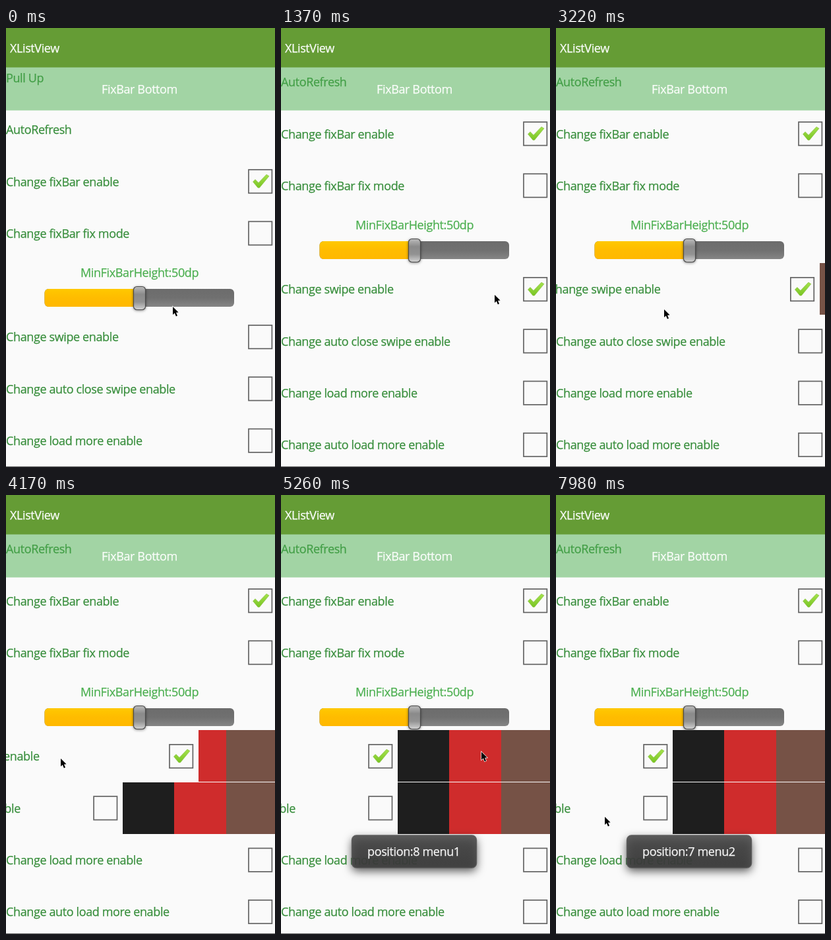
An HTML page with a canvas for the animation above (8000 ms loop, 408 by 663 pixels).

```html
<!DOCTYPE html>
<html lang="en">
<head>
<meta charset="utf-8">
<title>XListView</title>
<style>
  html, body { margin: 0; width: 100%; height: 100%; overflow: hidden; background: #fafafa; }
  canvas { display: block; }
</style>
</head>
<body>
<canvas id="stage" width="408" height="663"></canvas>
<script>
const ctx = document.getElementById('stage').getContext('2d');
const LOOP = 8000, ROW = 78.3, LIST_WIDTH = 411.8, OPEN = 3 * ROW, SETTLE = 290;
const MENU = ['#1e1e1e', '#cf2c2c', '#765246'];
const ROWS = ['Pull Up', 'AutoRefresh', 'Change fixBar enable', 'Change fixBar fix mode', null,
  'Change swipe enable', 'Change auto close swipe enable', 'Change load more enable',
  'Change auto load more enable'];

// The pointer glides to `from` between leave and press, then drags to `to` until release.
// A dragged row follows the pointer and settles at `rest` after the release.
const gesture = (leave, press, release, from, to = from, row = -1, rest = 0) =>
  ({ leave, press, release, from, to, row, rest });
const GESTURES = [
  gesture(0, 45, 290, [253, 421], [253, 380]),
  gesture(470, 950, 1370, [324, 399], [324, 403]),
  gesture(1680, 1680, 1900, [324, 403], [262, 412], 5),
  gesture(1900, 2150, 3000, [249, 435], [164, 425], 5),
  gesture(3220, 3460, 3680, [300, 456], [130, 446], 6, OPEN),
  gesture(3680, 3900, 4170, [203, 398], [83, 398], 5, OPEN),
  gesture(4170, 4590, 4590, [230, 470]),
  gesture(4840, 5260, 5260, [304, 388]),
  gesture(5940, 6900, 7200, [273, 588], [203, 577], 7),
  gesture(7740, 7980, 7980, [74, 486])
];

const mix = (a, b, p) => a + (b - a) * p;

function ramp(t, start, end) {
  const p = Math.min(1, Math.max(0, (t - start) / (end - start || 1)));
  return p * p * (3 - 2 * p);
}

function pointerAt(t) {
  return GESTURES.reduce((pos, g) => {
    const glide = ramp(t, g.leave, g.press), drag = ramp(t, g.press, g.release);
    return pos.map((v, i) => mix(mix(v, g.from[i], glide), g.to[i], drag));
  }, GESTURES[0].from);
}

function rowShift(row, t) {
  const g = GESTURES.filter(g => g.row === row && t >= g.press).pop();
  if (!g) return 0;
  const dragged = (g.from[0] - g.to[0]) * ramp(t, g.press, g.release);
  return mix(dragged, g.rest, ramp(t, g.release, g.release + SETTLE));
}

// A hairline outline gives the slightly heavier weight of the lettering.
function text(str, x, y, color, align = 'left') {
  ctx.fillStyle = ctx.strokeStyle = color;
  ctx.lineWidth = 0.25;
  ctx.textAlign = align;
  ctx.fillText(str, x, y);
  ctx.strokeText(str, x, y);
}

function rect(x, y, w, h, fill) {
  ctx.fillStyle = fill;
  ctx.fillRect(x, y, w, h);
}

function rounded(x, y, w, h, r, fill) {
  ctx.beginPath();
  ctx.roundRect(x, y, w, h, r);
  ctx.fillStyle = fill;
  ctx.fill();
}

function outline(color, width) {
  ctx.strokeStyle = color;
  ctx.lineWidth = width;
  ctx.stroke();
}

function gradient(y0, y1, ...colors) {
  const g = ctx.createLinearGradient(0, y0, 0, y1);
  colors.forEach((color, i) => g.addColorStop(i / (colors.length - 1), color));
  return g;
}

function polygon(x, y, points) {
  ctx.beginPath();
  points.forEach(([px, py]) => ctx.lineTo(x + px, y + py));
  ctx.closePath();
}

function shadow(color, blur, offset) {
  ctx.shadowColor = color;
  ctx.shadowBlur = blur;
  ctx.shadowOffsetY = offset;
}

function checkbox(x, y, checked) {
  ctx.strokeStyle = '#636363';
  ctx.lineWidth = 1.7;
  ctx.strokeRect(x, y - 17.7, 35.4, 35.4);
  if (!checked) return;
  polygon(x + 18, y, [[-11.5, 0.5], [-8, -3], [-3, 2], [9, -10.5], [13, -8], [-1.5, 9.5], [-4, 9.5]]);
  ctx.fillStyle = gradient(y - 11, y + 10, '#a6e34e', '#78c422');
  ctx.fill();
  outline('rgba(120,180,50,.5)', 1);
}

function slider(y) {
  text('MinFixBarHeight:50dp', 202.5, Math.round(y - 12.3), '#4caf50', 'center');
  const top = Math.round(y + 5.4), end = top + 27;
  rounded(58.5, top, 287.5, 27, 6, gradient(top, end, '#6c6c6c', '#707070', '#858585'));
  rounded(58.5, top, 140, 27, [6, 0, 0, 6], gradient(top, end, '#ffc800', '#ffbc00', '#ffb800'));
  ctx.save();
  shadow('rgba(0,0,0,.6)', 4, 1);
  rounded(193.5, top - 3.5, 18, 35, 5, gradient(top - 3, top + 31, '#b9b9b9', '#8a8a8a', '#929292', '#d0d0d0'));
  ctx.restore();
  outline('#4c4c4c', 1.2);
}

function menu(y, shift) {
  const top = Math.round(y - ROW / 2 - 0.5), edge = Math.round(LIST_WIDTH - shift);
  ctx.save();
  ctx.beginPath();
  ctx.rect(edge, top, shift, Math.round(top + ROW) - top);
  ctx.clip();
  MENU.forEach((color, k) => rect(Math.round(LIST_WIDTH - ROW * (3 - k)), top, ROW + 1, ROW + 1, color));
  ctx.restore();
}

function row(label, i, t, scroll) {
  const y = 75.4 + ROW * i - scroll;
  if (!label) return slider(y);
  const shift = rowShift(i, t);
  if (shift > 0) menu(y, shift);
  text(label, -shift, Math.round(y + 6.5), '#388e3c');
  if (i > 1) checkbox(368 - shift, y - 0.3, i === 2 || (i === 5 && t >= 770));
}

function toast(label, alpha) {
  if (alpha <= 0) return;
  ctx.save();
  ctx.globalAlpha = alpha;
  shadow('rgba(0,0,0,.75)', 14, 5);
  rounded(107.5, 514, 189, 49, 7, gradient(514, 563, 'rgba(74,74,74,.88)', 'rgba(60,60,60,.88)'));
  shadow('transparent', 0, 0);
  outline('rgba(85,85,85,.8)', 1.5);
  text(label, 131, 545, '#f6f6f6');
  ctx.restore();
}

function pointer(x, y) {
  polygon(x, y, [[0, 0], [0, 12], [2.8, 9.6], [4.9, 14.4], [7, 13.5], [5, 8.8], [8.6, 8.6]]);
  outline('#fff', 1.4);
  ctx.fillStyle = '#000';
  ctx.fill();
}

function draw(t) {
  ctx.font = '18px "Open Sans", "Noto Sans", sans-serif';
  ctx.letterSpacing = '-0.38px';
  rect(0, 0, 408, 663, '#fafafa');
  const scroll = 69.5 * ramp(t, 45, 290) + 2.5 * ramp(t, 470, 530);
  ROWS.forEach((label, i) => row(label, i, t, scroll));
  rect(0, 59, 408, 65.5, 'rgba(76,175,80,.5)');
  text('FixBar Bottom', 202.5, 99, '#fafdfa', 'center');
  rect(0, 0, 408, 59.5, '#659c35');
  text('XListView', 6, 37, '#fafdfa');
  rect(0, 662, 408, 1, '#666');
  toast('position:8 menu1', ramp(t, 4840, 5080) - ramp(t, 6850, 7000));
  toast('position:7 menu2', ramp(t, 7050, 7250));
  pointer(...pointerAt(t));
}

const start = performance.now();
function frame() {
  draw((performance.now() - start) % LOOP);
  requestAnimationFrame(frame);
}
frame();
</script>
</body>
</html>
```
